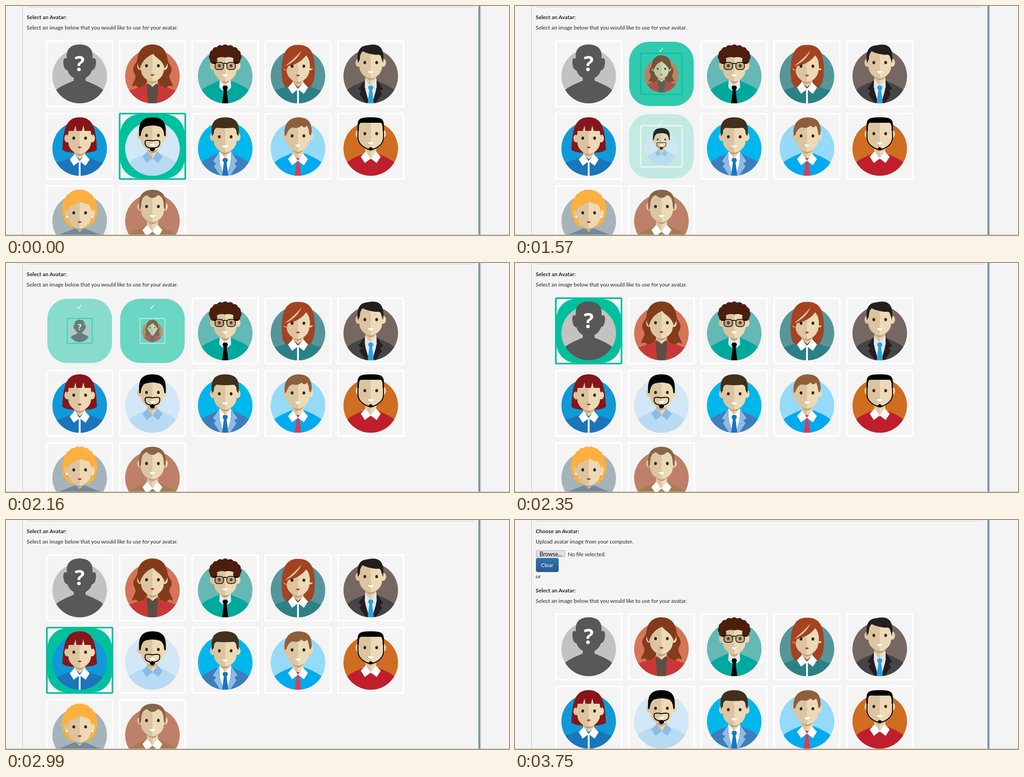
An HTML page for the animation above (5.85 s loop, 1106 by 506 pixels).

```html
<!DOCTYPE html>
<html lang="en">
<head>
<meta charset="utf-8">
<title>Avatar picker</title>
<style>
html, body { margin: 0; width: 100%; height: 100%; overflow: hidden; background: #f4f4f4 }
svg { display: block; width: 1106px; height: 506px }
text { font: 11.84px Lato, Carlito, sans-serif; fill: #222 }
.bold { font-weight: 700 }
.mark { font: 700 46px "Open Sans", sans-serif; fill: #fff; text-anchor: middle }
.check { font: 17px "DejaVu Sans", sans-serif; fill: #fff; text-anchor: middle }
</style>
</head>
<body>
<svg id="stage" viewBox="0 0 1106 506"></svg>
<script>
const TEAL = '#00c09e', DARK_SKIN = '#dbc4a0', LIGHT_SKIN = '#ecd9b5';

// Drawing helpers: x is measured from the card's middle, y from its top.
const shape = (fill, d, attrs = '') => `<path fill="${fill}" d="${d}" ${attrs}/>`;
const pair = (left, right, d) => shape(left, d) + shape(right, d, 'transform="scale(-1 1)"');
const both = (fill, d) => pair(fill, fill, d);
const skin = d => pair(DARK_SKIN, LIGHT_SKIN, d);
const dot = (x, y, r, fill) => `<circle cx="${x}" cy="${y}" r="${r}" fill="${fill}"/>`;
const line = (d, width) => shape('none', d, `stroke="#000" stroke-width="${width}"`);
const inDisc = content => `<g clip-path="url(#disc)">${content}</g>`;
const shoulders = (fill, y = 89) =>
  shape(fill, `M-53 111C-45 ${y + 13} -31 ${y + 8} -13 ${y}H13C31 ${y + 8} 45 ${y + 13} 53 111L60 145H-60Z`);

const collar = (fill, dy) =>
  both(fill, `M-11 ${85 + dy}L-22 ${97 + dy}L-13 ${111 + dy}L0 ${101 + dy}Z`);
const placket = shape('#fff', 'M-2 106H2V140H-2Z');
const tie = fill => shape(fill, 'M-4 100H4L6 105L3 110L7 140H-7L-3 110L-6 105Z');
const shirt = fill => shape(fill, 'M-13 86H13L10 140H-10Z');
const shirtCollar = fill => both(fill, 'M-12 86L-13 104L-6 111L0 101Z');
const lapels = fill => both(fill, 'M-13 87L-27 107L-20 112L-25 118L-10 140H-3L-14 102Z');

function curls(fill, rx, ry, cy, r, from, to, count) {
  let out = '';
  for (let i = 0; i <= count; i++) {
    const a = (from + (to - from) * i / count) * Math.PI / 180;
    out += dot(rx * Math.cos(a), cy + ry * Math.sin(a), r, fill);
  }
  return out;
}

function person({ bg, eye: e, body, under = '', back = '', over = '', hair, lips, w = 25, top = '' }) {
  const s = e + 19;
  return dot(0, 79, 60, bg) + inDisc(shoulders(body, lips ? 96 : 89) + under) + back
    + skin(`M0 ${e + 20}H-12V92L0 103Z`)
    + shape('#bf9f79', `M-12 ${e + 24}V${e + 32}Q0 ${e + 46} 12 ${e + 32}V${e + 24}Z`)
    + inDisc(over)
    + skin(`M-23 ${e - 7}Q-34 ${e - 11} -33.5 ${e + 2}Q-32 ${e + 11} -23 ${e + 9}Z`)
    + skin(`M0 ${e - 28}H${-w}V${e + 8}Q${-w} ${e + 24} -9 ${e + 33}Q-4 ${e + 35} 0 ${e + 35}Z`)
    + hair + both('#38200f', `M-16 ${e}a3 3.5 0 0 1 6 0a3 3.5 0 0 1 -6 0Z`)
    + (lips ? shape('#d2232f', `M-4.5 ${s + 1}Q0 ${s - 2} 4.5 ${s + 1}Q0 ${s + 6} -4.5 ${s + 1}Z`)
            : shape('#fff', `M-6 ${s}H6Q5 ${s + 5} 0 ${s + 5}Q-5 ${s + 5} -6 ${s}Z`))
    + top;
}

const glasses = [-13, 13].map(x =>
  `<rect x="${x - 9.5}" y="48.5" width="19" height="16" rx="6" fill="#86664a" fill-opacity=".4" stroke="#000" stroke-width="1.5"/>`
).join('') + line('M-27 50H-20M-4 52Q0 49 4 52M20 50H27', 1.8);

const avatars = [
  dot(0, 79, 60, '#c2c2c2') + inDisc(shoulders('#585858'))
    + shape('#585858', 'M-28 40C-31 18 -18 9 0 9S31 18 28 40Q36 37 36 48Q35 65 27 66Q23 78 13 83V92H-13V83Q-23 78 -27 66Q-35 65 -36 48Q-36 37 -28 40Z')
    + '<text class="mark" y="67.5">?</text>',
  person({ bg: '#d67457', eye: 56, body: '#c93838', lips: true,
    under: shape('#5a4f43', 'M-13 98H13L9 140H-9Z'),
    back: both('#833c1b', 'M0 10C-22 10 -31 24 -33 40C-34 52 -43 54 -42 66C-41 74 -35 76 -38 84C-40 92 -46 96 -44 103C-40 98 -34 100 -31 105C-27 104 -16 101 -12 92L0 90Z'),
    hair: shape('#833c1b', 'M-28 64C-24 50 -16 36 2 30C8 40 22 42 27 62L32 54C35 22 20 9 0 9S-35 22 -32 54Z') }),
  person({ bg: '#66b8b5', eye: 56, body: '#00a99d',
    over: shirtCollar('#e9ebee') + tie('#000'),
    hair: shape('#4b1e0e', 'M-29 52V28Q0 0 29 28V52L24 44Q14 34 0 38Q-14 34 -24 44Z')
      + curls('#4b1e0e', 28, 19, 36, 8, 155, 385, 10),
    top: glasses }),
  person({ bg: '#56969b', eye: 57, body: '#2b8186', lips: true,
    back: shape('#a44322', 'M0 10C-36 8 -36 54 -36 72Q-36 96 -26 104H26Q37 92 37 70C38 40 34 10 0 10Z'),
    over: collar('#fff', 7) + placket,
    hair: shape('#a44322', 'M-33 62C-38 24 -18 9 2 10C28 10 38 30 34 62H26Q28 44 18 33Q4 52 -22 57L-25 66Z')
      + shape(DARK_SKIN, 'M-29 57Q-3 47 8 22Q-7 40 -29 57Z') }),
  person({ bg: '#766762', eye: 49, body: '#454446',
    under: shirt('#e6e7eb') + lapels('#231f20'),
    over: shirtCollar('#e6e7eb') + tie('#27a3de'),
    hair: shape('#231f20', 'M-28 50C-32 24 -24 12 -8 11Q20 4 26 24Q29 30 27 50L23 38Q22 30 12 32Q-6 30 -18 24Q-24 30 -24 42Z') }),
  person({ bg: '#1199d7', eye: 56, body: '#1b75bb', lips: true,
    back: shape('#861619', 'M0 10C-32 10 -36 40 -38 82Q-26 90 0 88Q26 90 38 82C36 40 32 10 0 10Z'),
    over: collar('#fff', 6) + placket,
    hair: shape('#861619', 'M-28 52Q-32 10 0 10T28 52L24 40H11L8 28L5 40H-7L-9 28L-13 40H-24Z') }),
  person({ bg: '#d2e7f7', eye: 50, body: '#b9daf3',
    over: collar('#8bbce5', 0),
    hair: shape('#000', 'M-29 52C-30 34 -32 10 0 10S30 34 29 52L26 51Q25 32 14 30Q0 26 -14 30Q-24 32 -26 51Z'),
    top: line('M0 62Q-14 59 -16 63Q-18 78 0 78Q18 78 16 63Q14 59 0 62Z', 2)
      + shape('#000', 'M-6 79Q0 73 6 79Q5 85 0 85Q-5 85 -6 79Z') }),
  person({ bg: '#00b7ec', eye: 53, body: '#3f7ebc',
    under: shirt('#fff') + lapels('#8cbbe6'),
    over: shirtCollar('#fff') + tie('#1b75bb'),
    hair: shape('#42301a', 'M-29 52C-32 30 -30 10 0 10S32 30 29 52L25 46Q25 34 18 33Q0 35 -18 33Q-25 34 -25 46Z') }),
  person({ bg: '#95daf8', eye: 51, body: '#00aaee',
    over: tie('#e23a50') + collar('#fff', 5),
    hair: shape('#8f5f3c', 'M-29 52C-33 26 -20 10 2 10Q32 10 30 44L28 50L25 48Q24 36 20 28Q14 36 8 28Q0 36 -12 32Q-22 36 -25 48Z') }),
  person({ bg: '#cf6d21', eye: 46, body: '#bf1e2d', w: 28,
    over: collar('#fff', 0),
    hair: shape('#000', 'M-29 40C-30 14 -28 10 0 10S30 14 29 40L26 40Q27 24 22 22H-22Q-27 24 -26 40Z'),
    top: line('M-28 36V54Q-28 70 -9 79Q0 83 9 79Q28 70 28 54V36', 2)
      + shape('#000', 'M-5 80Q0 72 5 80Q3 83 0 83Q-3 83 -5 80Z') }),
  person({ bg: '#a5b3ba', eye: 61, body: '#728a9a', lips: true,
    back: curls('#fbb03f', 31, 36, 54, 9, 125, 415, 17)
      + '<ellipse cy="54" rx="32" ry="36" fill="#fbb03f"/>',
    hair: shape('#fbb03f', 'M-28 60Q-34 16 0 16T28 60L24 50Q20 38 12 42Q4 34 -2 40Q-10 38 -14 46Q-22 44 -25 54Z'),
    top: dot(-28, 70, 2.5, '#fff') + dot(28, 70, 2.5, '#fff') }),
  person({ bg: '#be8068', eye: 47, body: '#a57c52',
    over: collar('#fff', 2),
    hair: shape('#886449', 'M-28 56C-33 30 -26 10 0 10S33 30 28 56L25 48Q25 24 12 22Q6 28 0 28Q-6 28 -12 22Q-25 24 -25 48Z') })
];

const card = (avatar, i) => `<g transform="translate(${162 + i % 5 * 160} ${76 + Math.floor(i / 5) * 160})">
  <g class="glow"><rect x="-71" y="3" width="142" height="142" rx="44" fill="${TEAL}"/><text class="check" y="27">✓</text></g>
  <g class="image"><rect class="frame" x="-72.2" y="1.8" width="144.4" height="144.4" rx="2" fill="none" stroke-width="3.6"/>${avatar}</g></g>`;

const stage = document.getElementById('stage');
stage.innerHTML = `<defs>
  <clipPath id="disc"><circle cy="79" r="60"/></clipPath>
  <linearGradient id="edge"><stop stop-color="#56738f"/><stop offset=".4" stop-color="#7d95ac"/><stop offset="1" stop-color="#f4f4f4"/></linearGradient>
  <linearGradient id="button" x2="0" y2="1"><stop stop-color="#3273b3"/><stop offset="1" stop-color="#295a8a"/></linearGradient></defs>
  <rect x="45.5" y="-20" width="983" height="22.5" rx="4" fill="none" stroke="#ccc"/>
  <path d="M36.5 0V505" stroke="#c6c6c6"/>
  <rect x="1039" width="6" height="505" fill="url(#edge)"/>
  <g id="upload">
    <text class="bold" x="45.5" y="29">Choose an Avatar:</text>
    <text x="45.5" y="52">Upload avatar image from your computer.</text>
    <rect x="46.5" y="67.5" width="63" height="14" fill="#e1e1e1" stroke="#adadad"/>
    <text x="54" y="79.5" style="font-size:12.5px;fill:#000">Browse...</text>
    <text x="116" y="79.5">No file selected.</text>
    <rect x="46.5" y="84.5" width="49" height="30" rx="3" fill="url(#button)" stroke="#2a5f94"/>
    <text x="57" y="104" style="fill:#fff">Clear</text>
    <text x="45.5" y="129">or</text>
  </g>
  <g id="heading">
    <text class="bold" x="45.5" y="29">Select an Avatar:</text>
    <text x="45.5" y="52">Select an image below that you would like to use for your avatar.</text>
  </g>
  <g id="cards">${avatars.map(card).join('')}</g>
  <path d="M0 505.5H1106" stroke="#b9b9b9"/>`;

const LOOP = 5850, REVEAL = 3420;
const [upload, heading, cards] = ['upload', 'heading', 'cards'].map(id => document.getElementById(id));
const parts = [...cards.children].map(g => ['glow', 'image', 'frame'].map(c => g.querySelector('.' + c)));

// Each change of selection runs in a few discrete steps.
const changes = [
  { at: 1290, end: 1590, steps: 5, first: .15, off: 6, on: 1 },
  { at: 1970, end: 2350, steps: 6, first: .012, off: 1, on: 0 },
  { at: 2660, end: 2990, steps: 5, first: .06, off: 0, on: 5 },
  { at: REVEAL, end: 3750, steps: 5, first: 0, off: 5, on: -1 }
];

function progress({ at, end, steps, first }, t) {
  if (t < at) return 0;
  if (t >= end) return 1;
  const k = Math.floor((t - at) / (end - at) * steps);
  return first + (1 - first) * (k / steps) ** 1.2;
}

const frameColor = teal => {
  const mix = c => Math.round(255 + (c - 255) * teal);
  return `rgb(${mix(0)},${mix(192)},${mix(158)})`;
};

function poseCard(i, glow, dip, teal) {
  const [glowPart, image, frame] = parts[i];
  glowPart.setAttribute('opacity', glow);
  image.setAttribute('opacity', 1 - .3 * dip);
  image.setAttribute('transform', `translate(0 74) scale(${1 - .63 * dip}) translate(0 -74)`);
  frame.setAttribute('stroke', frameColor(teal));
}

function draw(t) {
  const open = t >= REVEAL;
  upload.setAttribute('visibility', open ? 'visible' : 'hidden');
  heading.setAttribute('transform', `translate(0 ${open ? 131 : 0})`);
  cards.setAttribute('transform', `translate(0 ${open ? 130 : 0})`);
  parts.forEach((_, i) => poseCard(i, 0, 0, 0));
  const change = changes.filter(c => t >= c.at).pop() || changes[0];
  const p = progress(change, t), dip = p < 1 ? Math.sin(Math.PI * p) : 0;
  poseCard(change.off, 1 - p, dip, Math.max(0, 1 - 3 * p));
  if (change.on >= 0) poseCard(change.on, p, dip, Math.min(1, 8 * p));
}

const start = performance.now();
function tick() {
  draw((performance.now() - start) % LOOP);
  requestAnimationFrame(tick);
}
tick();
</script>
</body>
</html>
```
